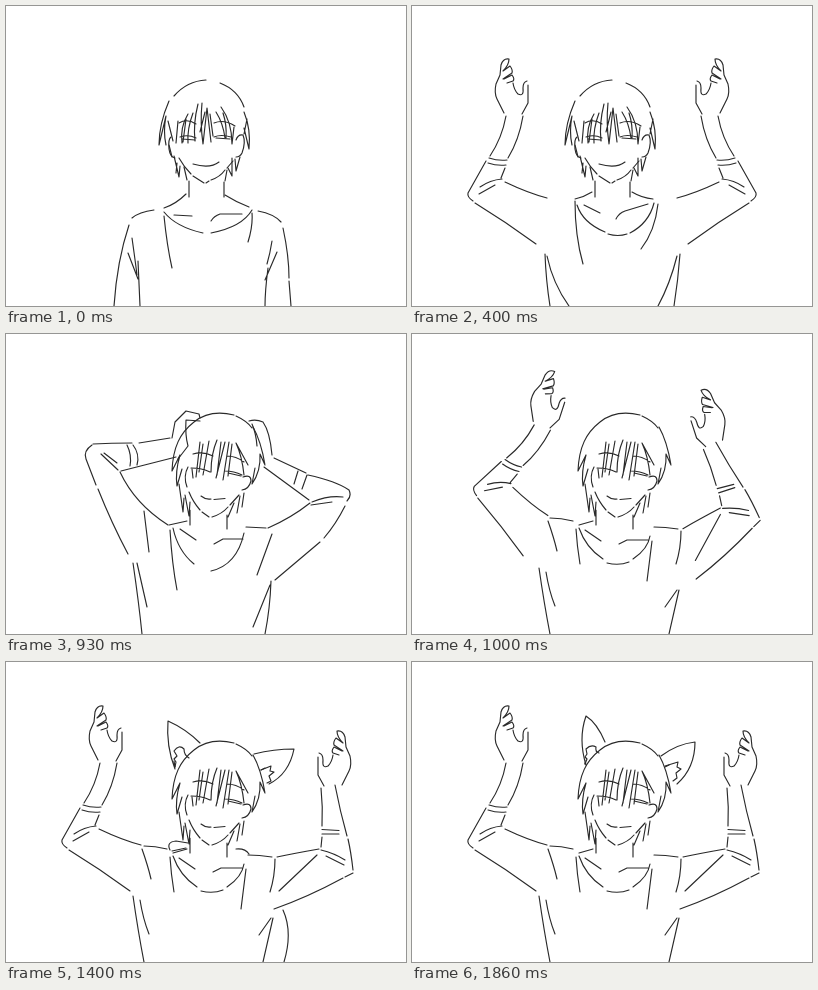
Write an HTML page that moves like this. It is 400 px wide and 300 px high and loops after 1930 ms.

```html
<!DOCTYPE html>
<html lang="en">
<head>
<meta charset="utf-8">
<title>Ear pop</title>
<style>
html, body { margin: 0; width: 100%; height: 100%; overflow: hidden; background: #fff; }
svg { display: block; width: 100%; height: 100%; }
path { fill: none; stroke: #2a2a2a; stroke-width: 1.15; stroke-linecap: round; stroke-linejoin: round; }
</style>
</head>
<body>
<svg id="stage" viewBox="0 0 400 300"></svg>
<script>
const LOOP = 1930;
const stage = document.getElementById('stage');

const line = (d, t = '') => `<path d="${d}" transform="${t}"/>`;
const both = (d, t = '') => line(d, t) + line(d, `translate(400 0) scale(-1 1) ${t}`);

// Blend two paths that share the same commands.
const mix = (a, b, k) => {
  const to = b.match(/[\d.]+/g);
  let i = 0;
  return a.replace(/[\d.]+/g, n => (+n + (to[i++] - n) * k).toFixed(1));
};

// Straight head
const face = line(`M200 74Q181 75 168 90M214 77Q232 84 238 101
  M165 131Q162 133 163 143Q164 151 169 152M230 134Q232 128 237 129Q240 136 236 147Q234 151 230 151
  M173 152Q178 161 185 168M187 170L198 177M200 177L203 175M205 174Q214 171 219 164M221 162L227 155
  M187 158Q204 163 213 156`) +
  line(`M173 117Q181 112 190 118M174 131Q182 128 190 132M176 133L189 134
  M208 117Q218 113 229 120M208 131Q215 128 225 131M210 132L224 133`) +
  line(`M182 108Q174 121 176 137M172 115L170 137M187 107Q181 123 182 137M192 98Q187 118 189 135
  M180 113L177 136M196 97Q194 117 197 138L201 102L205 136M199 106L194 126M204 108L207 130
  M210 106Q217 117 219 132M217 107Q221 119 220 132M215 101Q226 116 226 138L228 121
  M168 150L173 171L174 160M171 157L170 167M178 161L181 174M163 139L166 151
  M226 152L226 170L222 162M229 153L230 165L234 151M221 164L219 175`);
const locks = line(`M163 95Q153 118 153 139L160 110Q157 126 160 139M162 115L167 135
  M238 106Q245 123 243 143L238 122M241 113L238 128`);
const neck = line('M183 175V191M218 176V191');

// Tilted head
const tilted = line(`M188 88Q204 75 228 81M230 82Q241 87 246 94
  M188 88C174 99 167 113 166 137L174 121Q169 138 171 152L176 135
  M247 93Q255 107 259 131L254 120Q255 137 246 150L249 134
  M182 133Q177 142 181 153M237 143Q245 140 245 147Q243 155 236 156
  M183 158Q187 168 194 176M196 178L203 183M206 183Q216 180 222 173M224 171L233 161
  M195 162Q200 166 205 165M208 165.5L219 164.5`) +
  line(`M187 120Q197 117 207 122M221 122Q230 122 238 128M185 134Q196 134 204 138M186 135L187 144
  M219 137Q228 137 236 141M222 139L235 142
  M194 108L190 143M197 110L193 138M203 107L197 141M211 106Q205 120 205 138M215 108L211 141
  M219 108L210 144M223 108L217 146M226 110L222 142M230 109Q236 122 238 141M230 109L242 131`) +
  line(`M173 150L177 178L178 164M179 161L183 182L184 168M234 162L231 179M228 169L222 183M238 159L236 173
  M184 176V191M221 181V195`);

// Bodies
const hanging = line(`M180 188Q170 198 158 202M219 189Q230 196 243 201M148 204Q133 206 126 212
  M123 219Q111 255 108 300M252 205Q268 208 275 216M277 222Q283 250 283 272M283 275L285 300
  M158 206Q170 221 197 227M205 227Q236 221 246 204M168 209L186 210M205 215Q208 210 214 208H236`) +
  line(`M158 210Q161 240 166 262M126 232Q129 253 131 269M122 247L132 273M132 255L134 300
  M246 207Q247 220 242 236M266 235Q264 248 261 258M271 246L259 274M262 262Q259 285 259 300`);
const torso = line(`M133 248Q134 275 138 300M135 250Q141 278 157 300M268 248Q266 275 262 300M265 250Q258 278 246 300`);
const open = torso + line(`M180 186Q172 191 163 193M220 186Q230 192 241 193
  M165 199Q171 217 193 226M196 228Q206 231 215 228M218 227Q237 217 242 197
  M163 195Q163 230 171 258M246 198Q243 225 229 243M172 199L188 207M204 213Q207 207 213 205L236 198`);
const wide = both(`M155 193Q136 190 126 198M124 201Q104 220 70 233M64 232L40 217M34 212Q15 198 0 182
  M8 222L25 238M31 243L65 266M68 268L76 266M79 265Q110 252 136 246
  M33 217Q25 226 26 236M36 219Q29 228 31 237M65 238L59 253M68 239L62 255`);
const low = both(`M155 195Q136 193 127 200M124 204Q96 231 65 253M60 257Q41 276 19 300
  M133 250Q113 272 92 300M46 271L62 286M43 275L58 290M84 240L101 259`);
const clasped = line(`M181 186L163 191M220 187L239 191M165 195Q170 213 179 221M181 223Q190 235 205 236
  M209 236Q228 232 234 220M235 217L241 194M161 193Q163 215 170 241M133 189Q140 209 152 220
  M130 185L138 205M267 187Q262 208 248 221M242 203L237 225M238 237L210 272
  M178 199L188 206M206 213Q208 207 214 206H231`) +
  line(`M128 248Q132 275 138 300M135 254Q140 280 157 300M269 248Q267 275 261 300M264 255Q258 280 246 300
  M61 128Q80 122 101 120M104 122L151 117M109 148L158 132M102 122L106 148M105 122L109 147
  M61 128Q59 134 64 142M66 145Q80 175 100 208M103 212L125 240M76 148Q88 157 103 157M79 146Q88 153 98 153
  M103 159Q125 180 160 192M151 117Q156 106 156 96Q158 89 165 88L166 84L173 81M156 95L162 89
  M167 88Q162 103 165 117L159 131M158 132L155 139L160 138`) +
  line(`M227 83L233 81L238 87Q243 98 244 113M225 87L232 88L238 98M246 115Q268 119 291 123
  M236 99Q233 114 243 130M293 120Q315 122 336 128M243 132L291 149M291 123L290 148M295 122L292 149
  M336 128Q338 133 335 140M333 148Q320 182 301 206M298 210Q285 228 270 240
  M299 155Q315 156 327 147M298 152Q312 152 320 145M297 158Q270 181 240 191M244 132L242 143L238 130`);
const lean = line(`M138 177L143 218M164 196Q166 230 171 256M266 200L251 241M167 194Q172 217 188 230
  M205 237Q231 231 238 199M174 195L190 206M208 210L217 205H237M163 191L181 187M240 193L260 194
  M127 229Q133 270 136 300M131 229L141 273M265 247Q264 275 259 300M264 251L247 293`);
const scratch = line(`M87 110Q105 109 126 109M133 109L164 104M115 137L170 123
  M121 111Q126 121 124 132M127 111Q134 120 131 131M86 111Q77 117 80 125L90 151M92 155Q106 190 122 220
  M95 120L112 136M98 119L111 129M114 138Q129 170 162 191
  M166 104L169 88L180 77L193 80L194 84M180 86L194 87M180 86Q179 101 182 112L172 125`) +
  line(`M243 87Q250 85 257 88Q264 98 266 121M246 90Q250 99 251 112M268 124L300 139M302 141Q330 147 343 156
  M258 133L303 166M292 137L288 150M301 141L296 155M343 156Q346 162 341 167M339 172Q330 190 318 204
  M314 208L269 246M306 168Q323 161 337 163M305 171L326 168M304 169Q285 184 262 194`);

// Raised arms share one hand
const hand = `M92 98L85 84Q82 78 84 69L88 60L89 50Q91 43 97 44Q97 50 91 56M91 56L98 51Q101 55 100 58L91 64
  M92 64L100 60Q103 64 101 66L95 68M101 68Q102 75 106 79Q112 82 111 73Q111 67 115 66M116 70V88L110 99`;
const armL = hand + `M94 101Q90 123 78 141M111 101Q107 125 96 143M77 143Q86 146 95 145M76 148Q85 151 94 150
  M93 153L89 163M74 146L56 178Q55 182 61 186M63 188Q94 207 124 229M68 172Q78 165 90 164M67 179L83 170
  M93 167Q116 178 135 183`;
const armR = `M315 126Q317 145 316 164M329 123Q334 149 341 174M342 177Q345 190 347 208M347 211L339 215
  M316 167.5L333 168.5M316 172H333M316 175L315 185M315 188Q328 191 339 198M320 194L338 203
  M313 187Q290 191 271 195M337 216Q302 235 268 247M311 193L273 229`;
const raised = (a = 0) => line(armL, `rotate(${a} 140 185)`) +
  line(armR, `rotate(${-a} 270 195)`) +
  line(hand, `rotate(${-a} 270 195) translate(428 25) scale(-1 1)`);
const chest = line(`M138 184Q149 184 161 187M167 191L181 187M167 194Q174 214 191 225M195 229Q207 232 217 228
  M221 225Q236 215 238 202M164 195Q165 212 168 230M136 187Q142 204 145 217M240 207L235 247
  M242 193Q253 193 266 195M269 197Q269 214 264 230M173 196L189 207M207 210L215 206H236
  M127 234Q132 269 138 300M134 238Q137 257 143 272M267 256L257 300M265 256L253 273`);

// Ears: flat, half, up
const ears = [
  'M171 115Q158 109 153 97Q168 96 187 87M250 92Q266 106 276 126Q270 128 260 129M160 108L172 99M260 127L274 124',
  'M169 107Q160 84 162 59Q180 67 194 81M248 92Q268 87 288 87Q283 112 263 122M169 105L168 99M255 108L259 106',
  'M174 103Q166 77 174 54Q185 61 193 80M249 94Q265 82 283 80Q283 106 265 122M173 102L173 98M253 105L257 103'];
const fluff = [
  'M169 105L170 100L168 97L171 94L168 89Q173 82 178 87Q178 93 183 96M255 108L265 104L264 109L268 110L263 114L265 119L261 121',
  'M173 102L175 97L173 95L175 92L174 87Q179 82 184 85Q183 90 187 91M253 104L266 100L265 105L269 107L264 111L265 116L261 119'];
const drawEars = k => {
  const i = k < 1 ? 0 : 1;
  return line(mix(ears[i], ears[i + 1], k - i)) +
    (k > .6 ? line(mix(fluff[0], fluff[1], Math.max(0, k - 1))) : '');
};

const shrug = line('M164 188Q160 180 170 179L182 181M166 189L180 186M230 187Q239 186 243 192');
const catPose = (k, tail = '', extra = '') => tilted + chest + raised() + drawEars(k) + line(tail) + extra;

const poses = [
  [0, face + locks + neck + hanging],
  [130, face + locks + neck + open + low],
  [260, face + locks + neck + open + wide],
  [400, face + locks + neck + open + both(armL, 'translate(0 9)')],
  [530, face + neck + clasped],
  [930, tilted + lean + scratch],
  [1000, tilted + chest + raised(18)],
  [1130, catPose(0, 'M66 300Q85 282 135 285')],
  [1260, catPose(.4, 'M104 300Q118 291 136 293')],
  [1330, catPose(.8, 'M272 257Q277 277 270 300', shrug)],
  [1400, catPose(1, 'M277 248Q287 270 278 300', shrug)],
  [1460, catPose(1.4, 'M273 252Q304 263 307 300')],
  [1530, catPose(2, 'M271 258Q322 260 341 300')],
  [1600, catPose(1.7, 'M269 270Q328 256 362 300')],
  [1660, catPose(2, 'M345 293Q359 283 369 300')],
  [1860, catPose(2)]
];

let shown = -1;
function draw(ms) {
  const t = ms % LOOP;
  const i = poses.filter(p => p[0] <= t).length - 1;
  if (i === shown) return;
  shown = i;
  stage.innerHTML = poses[i][1];
}

const start = performance.now();
function tick() {
  draw(performance.now() - start);
  requestAnimationFrame(tick);
}
tick();
</script>
</body>
</html>
```
